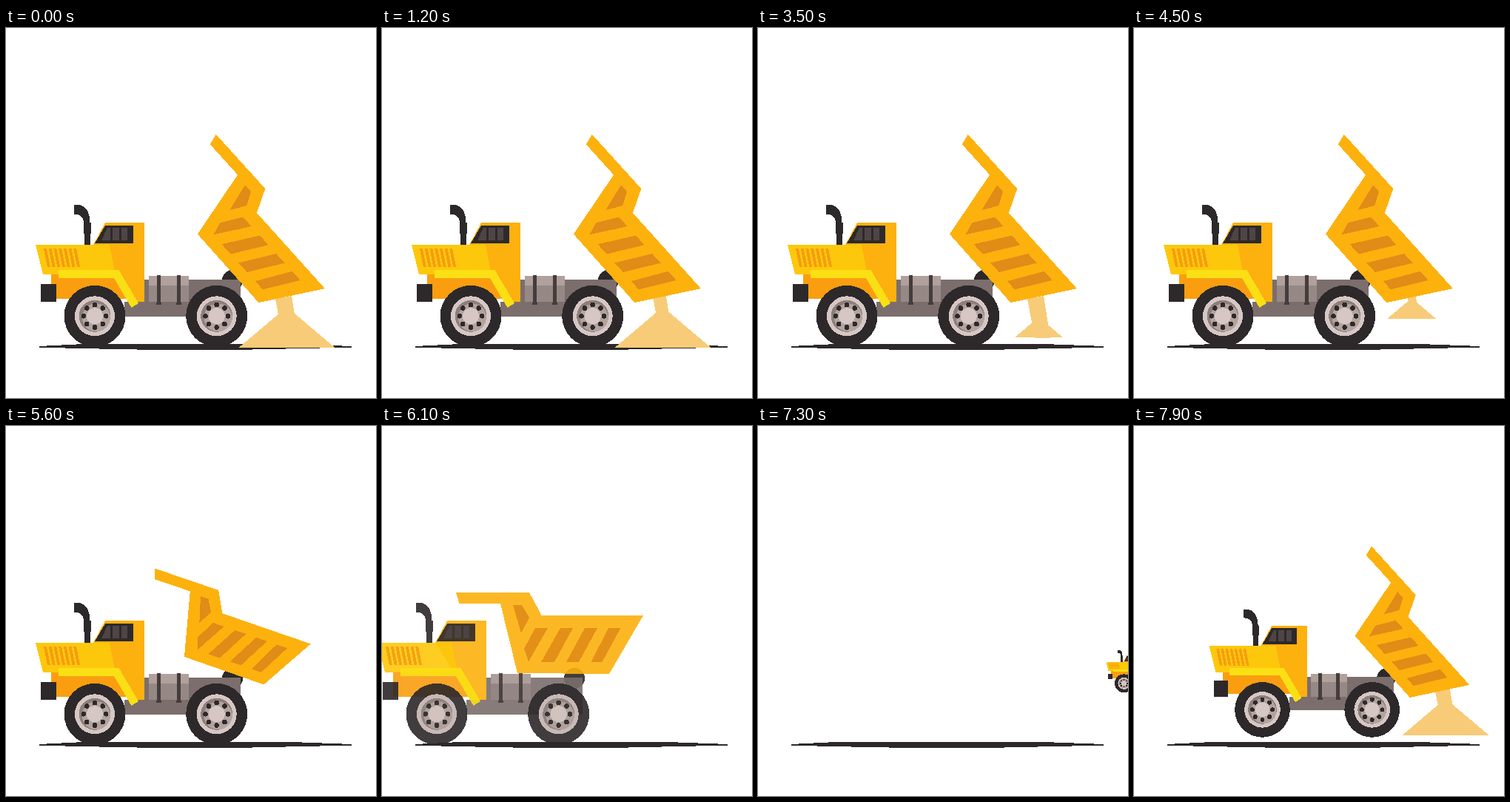
An HTML page for the animation above (8 s loop, 500x500 px).

```html
<!DOCTYPE html>
<html lang="en">
<head>
<meta charset="utf-8">
<title>Dump truck</title>
<style>
  html, body { margin: 0; width: 100%; height: 100%; overflow: hidden; background: #fff; }
  svg { display: block; width: 100%; height: 100%; }
</style>
</head>
<body>
<svg viewBox="0 0 500 500" shape-rendering="crispEdges">
  <defs>
    <g id="wheel">
      <circle r="41.5" fill="#2d292a"/>
      <circle r="27" fill="#d6c7c4"/>
      <circle r="21.5" fill="#8d7f7b"/>
      <circle cx="2" cy="2" r="19" fill="#b3a39f"/>
      <circle r="11" fill="#d6c7c4"/>
      <g id="bolts" fill="#2d292a"></g>
    </g>
  </defs>

  <path id="ground" fill="#2d292a" d="M45 430 95 427.5 185 427 400 427.5 467 430V431.6L400 433 325 434.7 187 434.7 100 433 45 431.6Z"/>

  <g id="sand" fill="#f8cb78">
    <path id="stream" d="M364 366 386 362 395 419 374 419Z"/>
    <path id="pile" d="M379.5 377 444.500 432 314.500 432Z"/>
  </g>

  <g id="truck">
    <circle cx="306" cy="341" r="14" fill="#2d292a"/>
    <path fill="#7b6e6c" d="M160 370H187V340H317V390H160Z"/>
    <rect x="193" y="335" width="54" height="35" fill="#968885"/>
    <rect x="193" y="335" width="54" height="13" fill="#b0a19d"/>
    <path fill="#453c3c" d="M204 334h5v37h1v3h-7v-3h1ZM231 334h5v37h1v3h-7v-3h1Z"/>

    <path fill="#2d292a" d="M92 238.5H96Q113 240 113.5 263H115V278H113.5V293H106V278H105V264Q105 252 92 251.5Z"/>
    <path fill="#fcb10e" d="M134 263H187V370H165L140 328 118 293Z"/>
    <path fill="#2d292a" d="M134 267H172V291H120Z"/>
    <path fill="#4f4545" d="M137 270H141V287H129ZM144 270H153V287H144ZM156 270H164V287H156Z"/>
    <path fill="#fa9e10" d="M61 332H145L164 366H61Z"/>
    <path fill="#fdc80b" d="M40 293H140L148 333H50Z"/>
    <g id="grille" fill="#f69d10"></g>
    <path fill="#fbdf15" d="M71 327H152.5L179 372 169.5 378 146 338H71Z"/>
    <rect x="47" y="346" width="21" height="24" fill="#2d292a"/>

    <g id="dump">
      <path fill="#fcb10d" d="M146 225 245 225 261.5 255.5 399 256 353 335 229 334 206 240 150.5 240Z"/>
      <path fill="#e08c17" d="M223 242H235L245 259 234 280Z
        M253 273H270L244 318.5 238 301Z
        M287 273H304L279 319H261Z
        M320 273H337L312 319H295Z
        M352 273H368.5L343.5 319H328.5Z"/>
    </g>
    <use href="#wheel" x="120" y="389.3"/>
    <use href="#wheel" x="284.7" y="389.3"/>
  </g>
</svg>
<script>
  const LOOP = 8000, STEP = 100;
  const PIVOT = { x: 306.5, y: 340 };
  const TILT = 47.8 * Math.PI / 180;
  const STREAM = { x: 379.5, y: 390.5 }, STREAM_SOURCE = { x: 374.5, y: 356 };
  const PILE = { x: 379.5, y: 404.3 }, PILE_SOURCE = { x: 371, y: 353 };
  const $ = id => document.getElementById(id);
  const place = (id, transform) => $(id).setAttribute('transform', transform);

  function add(parent, tag, attributes) {
    const node = document.createElementNS('http://www.w3.org/2000/svg', tag);
    for (const name in attributes) node.setAttribute(name, attributes[name]);
    $(parent).append(node);
  }

  for (let i = 0; i < 8; i++) {
    const a = i * Math.PI / 4;
    add('bolts', 'circle', { cx: 15.2 * Math.cos(a), cy: 15.2 * Math.sin(a), r: 3.3 });
  }
  for (let i = 0; i < 7; i++) {
    add('grille', 'path', { d: `M${51 + i * 6.7} 298h4l5 25h-4z` });
  }

  // Scales a part by k around its centre while the centre heads for "target".
  function shrink(id, k, centre, target) {
    const x = target.x + (centre.x - target.x) * k;
    const y = target.y + (centre.y - target.y) * k;
    place(id, `translate(${x} ${y}) scale(${k}) translate(${-centre.x} ${-centre.y})`);
  }

  // Blends the matrices of the flat and raised poses, so corners travel in straight lines.
  function raise(k) {
    const a = 1 + k * (Math.cos(TILT) - 1), b = k * Math.sin(TILT);
    const e = PIVOT.x - a * PIVOT.x + b * PIVOT.y;
    const f = PIVOT.y - b * PIVOT.x - a * PIVOT.y;
    place('dump', `matrix(${a} ${b} ${-b} ${a} ${e} ${f})`);
  }

  function draw(ms) {
    const t = Math.floor((ms % LOOP) / STEP) * STEP;
    const phase = Math.floor(t / 1000), p = t % 1000 / 1000, q = 1 - p;

    shrink('stream', [1, q, p, 1, q, 0, 0, 1][phase], STREAM, STREAM_SOURCE);
    shrink('pile', [1, 1, q, p, q, 0, 0, 1][phase], PILE, phase === 4 ? PILE_SOURCE : PILE);
    raise([1, 1, 1, 1, 1, q, 0, 1][phase]);

    let truck = '', sand = '';
    if (phase === 6) truck = `translate(${-460 * p} 0)`;
    if (phase === 7) {
      truck = `translate(${655 * q} ${330 * q}) scale(${p})`;
      sand = `translate(${795 * q} ${290 * q}) scale(${p})`;
    }
    place('truck', truck);
    place('sand', sand);
    $('truck').setAttribute('fill-opacity', phase === 6 ? q : 1);
  }

  const start = performance.now();
  function tick() {
    draw(performance.now() - start);
    requestAnimationFrame(tick);
  }
  draw(0);
  tick();
</script>
</body>
</html>
```
